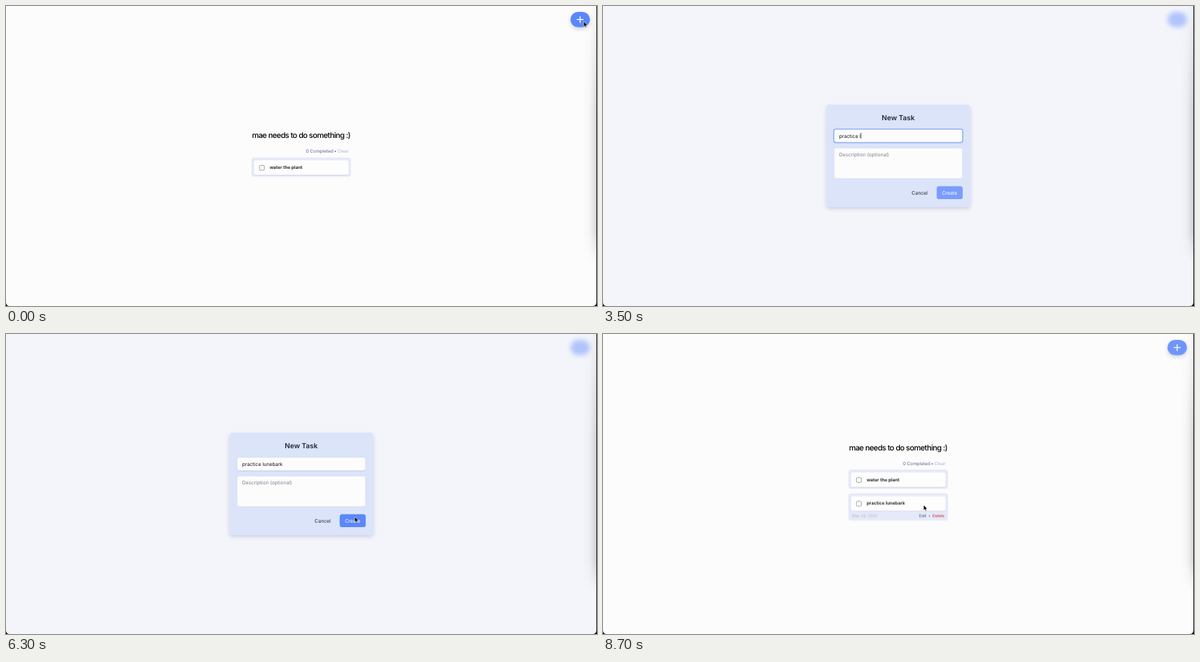
Recreate the animation shown at these times as an HTML page. Size 800 by 407 pixels, loop 9000 ms.

```html
<!DOCTYPE html>
<html lang="en">
<head>
<meta charset="utf-8">
<title>To-do list</title>
<style>
  html, body { margin: 0; width: 100%; height: 100%; overflow: hidden; background: #fcfcfc; }
  svg { display: block; width: 800px; height: 407px; }
  text { font: 6.64px Inter, sans-serif; text-rendering: geometricPrecision; white-space: pre; }
  .heading { font-size: 10.45px; font-weight: 450; letter-spacing: -.05em; }
  .title { font-size: 9.5px; font-weight: 600; }
  .semi { font-weight: 600; }
  .medium { font-weight: 500; }
  .small { font-size: 6.1px; }
  .name { font-size: 6.1px; font-weight: 600; fill: #15171c; }
  .tiny { font-size: 5.25px; }
  .hint { fill: #7b7f88; }
  .mid { text-anchor: middle; }
  .end { text-anchor: end; }

  #list, #added, #footer, #plus, #modal, #ring, #create, #cursor, #arrow, #beam {
    animation: 9s step-end infinite;
  }
  #list { animation-name: list; }
  #added { animation-name: added; }
  #footer { animation-name: footer; }
  #plus { animation-name: plus; }
  #modal { animation-name: modal; animation-timing-function: linear; }
  #ring { animation-name: ring; }
  #create { animation-name: create; }
  #cursor { animation-name: move; animation-timing-function: ease-in-out; }
  #arrow { animation-name: arrow; }
  #beam { animation-name: beam; }

  @keyframes list {
    0% { transform: none; }
    70.4% { transform: translateY(-16.1px); }
    79.8%, 100% { transform: translateY(-21.5px); }
  }
  @keyframes added { 0% { opacity: 0; } 70.4%, 100% { opacity: 1; } }
  @keyframes footer { 0% { opacity: 0; } 79.8%, 100% { opacity: 1; } }
  @keyframes plus { 0% { fill: #5b87fa; } 4.4%, 100% { fill: #7096fb; } }
  @keyframes modal {
    0%, 2.1% { opacity: 0; }
    4.4%, 70.4% { opacity: 1; }
    72.2%, 100% { opacity: 0; }
  }
  @keyframes ring { 0% { opacity: 0; } 9.8% { opacity: 1; } 64.2%, 100% { opacity: 0; } }
  @keyframes create { 0% { fill: #7a9cfb; } 57.6%, 100% { fill: #5b87fa; } }
  @keyframes move {
    0%, 2.2% { transform: translate(782px, 21px); }
    8.8% { transform: translate(441px, 181.5px); }
    11%, 53.2% { transform: translate(441.5px, 178px); }
    56.7% { transform: translate(485px, 266px); }
    58.9% { transform: translate(470px, 257px); }
    61%, 64.4% { transform: translate(467px, 253.8px); }
    69.9% { transform: translate(472px, 248px); }
    72%, 79% { transform: translate(473px, 249px); }
    79.9% { transform: translate(462px, 247px); }
    86.6%, 100% { transform: translate(434px, 232px); }
  }
  @keyframes arrow { 0% { opacity: 1; } 10.4% { opacity: 0; } 54.4%, 100% { opacity: 1; } }
  @keyframes beam {
    0% { opacity: 0; }
    10.4% { opacity: 1; }
    17.6% { opacity: 0; }
    53.2% { opacity: 1; }
    54.4%, 100% { opacity: 0; }
  }
</style>
</head>
<body>
<svg viewBox="0 0 800 407">
  <defs>
    <filter id="soft" x="-50%" y="-50%" width="200%" height="200%"><feGaussianBlur stdDeviation="3"/></filter>
    <filter id="drop" x="-20%" y="-40%" width="140%" height="190%">
      <feDropShadow dx="0" dy="2.5" stdDeviation="2.5" flood-color="#34426b" flood-opacity=".22"/>
    </filter>
    <filter id="lift" x="-10%" y="-30%" width="120%" height="170%">
      <feDropShadow dx="0" dy=".5" stdDeviation=".6" flood-color="#34426b" flood-opacity=".22"/>
    </filter>
    <linearGradient id="side">
      <stop offset="0" stop-opacity="0"/>
      <stop offset=".5" stop-opacity=".025"/>
      <stop offset="1" stop-opacity=".14"/>
    </linearGradient>
    <linearGradient id="fade" x2="0" y2="1">
      <stop offset="0" stop-color="#fff" stop-opacity=".15"/>
      <stop offset=".4" stop-color="#fff"/>
      <stop offset=".88" stop-color="#fff"/>
      <stop offset="1" stop-color="#fff" stop-opacity="0"/>
    </linearGradient>
    <mask id="tall"><rect x="780" width="20" height="348" fill="url(#fade)"/></mask>
    <g id="card">
      <rect x="335.6" y="209.2" width="128.2" height="19.8" rx="2.8" fill="#fdfdfe" filter="url(#lift)"/>
      <rect x="343.2" y="216.3" width="6.5" height="6.5" rx="1.2" fill="#fff" stroke="#7b7b80" stroke-width=".7"/>
    </g>
  </defs>

  <rect width="800" height="407" fill="#fcfcfc"/>

  <g id="list">
    <text class="heading" x="332.9" y="179.2">mae needs to do something :)</text>
    <text class="small" x="406" y="199.3" fill="#5c659a">0 Completed</text>
    <text class="small mid" x="445.7" y="199.3" fill="#5c659a">•</text>
    <text class="small end" x="463.7" y="199.3" fill="#aab1d3">Clear</text>

    <rect x="332.2" y="205.6" width="134.8" height="26.2" rx="4" fill="#e6e9f8"/>
    <use href="#card"/>
    <text class="name" x="357" y="221.1">water the plant</text>

    <g id="added">
      <rect x="332.2" y="237.8" width="134.8" height="26.2" rx="4" fill="#e6e9f8"/>
      <g id="footer">
        <rect x="332.2" y="237.8" width="134.8" height="37" rx="4" fill="#e6e9f8"/>
        <text class="tiny" x="337" y="270" fill="#b2b6c6">May 29, 2025</text>
        <text class="tiny medium" x="428" y="270" fill="#4e6591">Edit</text>
        <text class="tiny mid" x="441.7" y="270" fill="#646d9c">•</text>
        <text class="tiny medium end" x="462.2" y="270" fill="#c9363c">Delete</text>
      </g>
      <use href="#card" y="32.2"/>
      <text class="name" x="357" y="253.3">practice lunebark</text>
    </g>
  </g>

  <g filter="url(#drop)"><rect id="plus" x="764" y="8" width="26.5" height="20.8" rx="10.4"/></g>
  <path d="M773.1 18.4h8.2M777.2 14.3v8.2" stroke="#fff" stroke-width="1.3" stroke-linecap="round"/>

  <g id="modal">
    <rect width="800" height="407" fill="#f4f5fb"/>
    <rect x="764" y="8" width="26.5" height="20.8" rx="10.4" fill="#b0c4fc" filter="url(#soft)"/>
    <rect x="302.5" y="134" width="194.5" height="138.5" rx="4" fill="#dbe4f9" filter="url(#drop)"/>
    <text class="title mid" x="399.6" y="154.9" fill="#20293a">New Task</text>
    <g fill="#fcfcfd" stroke="#cdd5e8" stroke-width=".5">
      <rect x="312.7" y="167.2" width="174" height="18" rx="2.8" filter="url(#lift)"/>
      <rect x="312.7" y="192.7" width="174" height="41.3" rx="2.8"/>
    </g>
    <rect id="ring" x="312.4" y="167" width="174.6" height="18.3" rx="3" fill="none" stroke="#7c9ff3" stroke-width="1.1"/>
    <text id="hint" class="hint" x="319.8" y="178.5">Task name</text>
    <text id="typed" x="319.8" y="178.5" fill="#101114"></text>
    <rect id="caret" y="172" width=".6" height="8"/>
    <text class="hint" x="319.8" y="203.9">Description (optional)</text>
    <text class="mid" x="428.7" y="256" fill="#20293a">Cancel</text>
    <rect id="create" x="451.7" y="244.5" width="35.2" height="17.6" rx="3.4"/>
    <text class="mid" x="469.3" y="256" fill="#fff">Create</text>
  </g>

  <rect x="780" width="19.5" height="348" fill="url(#side)" mask="url(#tall)"/>
  <path fill-rule="evenodd" d="M0 0H800V407H0ZM0 0V402Q0 407 5 407H794Q799.2 407 799.2 402V0Z"/>

  <g id="cursor">
    <path id="arrow" d="M0 0V7.2L1.7 5.7 2.8 8.2 3.9 7.7 2.9 5.3H5.1Z" stroke="#fff" stroke-width=".5"/>
    <path id="beam" d="M.8 0Q2.3 0 2.3 1.2 2.3 0 3.8 0M2.3 1V7.6M.8 8.6Q2.3 8.6 2.3 7.4 2.3 8.6 3.8 8.6" fill="none" stroke="#222" stroke-width=".6"/>
  </g>
</svg>
<script>
  const LOOP = 9000, FOCUS = 880, BLUR = 5780, BLINK = 500;
  const TASK = "practice lunebark";
  // Time of each key press, one per character
  const keys = [1580, 1780, 2080, 2780, 3080, 3180, 3280, 3380, 3480, 3480,
                3580, 3780, 4180, 4180, 4280, 4480, 4580];
  const [hint, typed, caret] = ["hint", "typed", "caret"].map(id => document.getElementById(id));
  let start;

  function draw(now) {
    start ??= now;
    const t = (now - start) % LOOP;
    const count = keys.filter(k => k <= t).length;
    const last = count ? keys[count - 1] : FOCUS;
    const focused = t >= FOCUS && t < BLUR;

    typed.textContent = TASK.slice(0, count);
    hint.style.opacity = count ? 0 : 1;
    caret.style.opacity = focused && (t - last) % (2 * BLINK) < BLINK ? 1 : 0;
    caret.setAttribute("x", 319.8 + (count ? typed.getComputedTextLength() : 0));
    requestAnimationFrame(draw);
  }
  requestAnimationFrame(draw);
</script>
</body>
</html>
```
